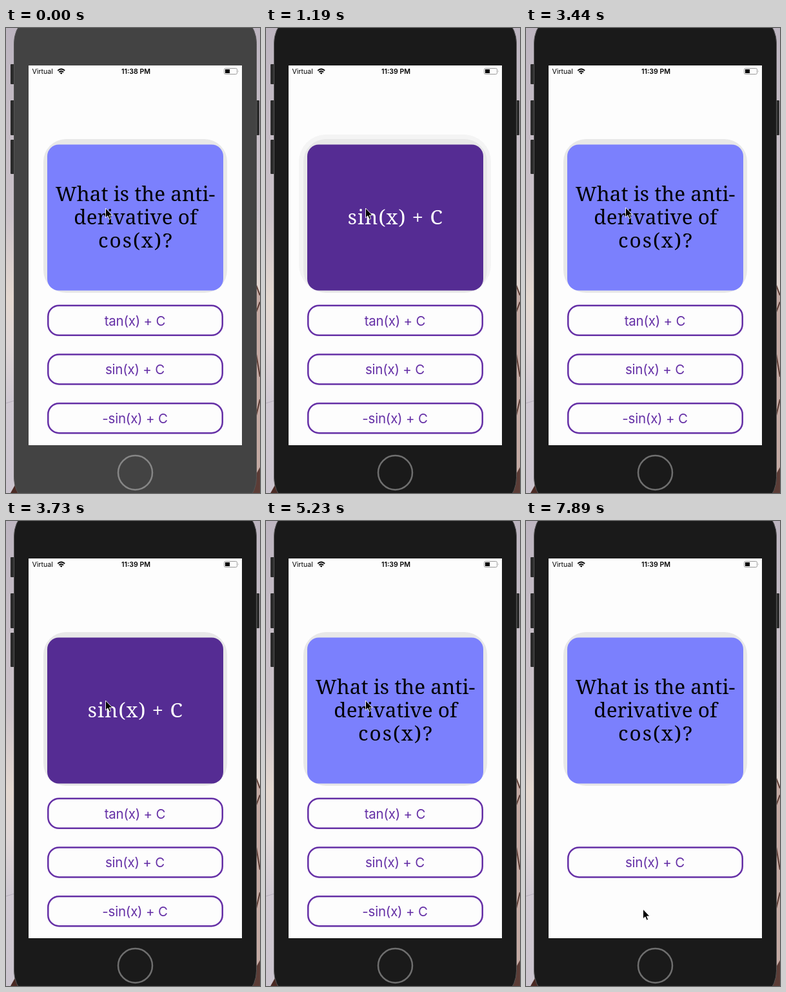
Animation of 394 by 720 pixels, one loop 8 s. Source, as an HTML page:

```html
<!DOCTYPE html>
<html lang="en">
<head>
<meta charset="utf-8">
<title>Flash card quiz</title>
<style>
  html, body { margin: 0; height: 100%; overflow: hidden; }
  svg { display: block; width: 394px; height: 720px; }
  text { text-anchor: middle; }
  .status { font: 10.6px Inter, sans-serif; }
  .card { font: 31.5px "Noto Serif", serif; }
  .choice text { font: 20.5px Inter, sans-serif; letter-spacing: -.2px; fill: #6530a6; }
  .choice rect { fill: none; stroke: #6530a6; stroke-width: 2.5; }
</style>
</head>
<body>
<svg viewBox="0 0 394 720">
  <defs>
    <linearGradient id="wall" x2="0" y2="1">
      <stop offset="0" stop-color="#bdb5c0"/>
      <stop offset=".4" stop-color="#cbc2c9"/>
      <stop offset=".58" stop-color="#e4d8d0"/>
      <stop offset=".68" stop-color="#dfd6d6"/>
      <stop offset=".8" stop-color="#d0c9d2"/>
      <stop offset="1" stop-color="#cbc4ce"/>
    </linearGradient>
  </defs>
  <rect width="394" height="720" fill="url(#wall)"/>
  <path d="M0 581L13 577" stroke="#b5adba"/>
  <path d="M7 720L16 704L32 720Z" fill="#4a2a24"/>
  <path d="M388 396L394 412V720H370L388 690Z" fill="#c4aaa3"/>
  <path d="M388 398L394 414M388 440L394 424M388 505L394 540M388 600L394 575"
        stroke="#5a3a32" stroke-width="2"/>
  <path d="M386 694L394 680V720H366Z" fill="#5b3c36"/>

  <g fill="#2b2b2b">
    <rect x="7" y="56" width="8" height="31" rx="1"/>
    <rect x="7" y="112" width="8" height="54" rx="1"/>
    <rect x="7" y="173" width="8" height="53" rx="1"/>
    <rect x="386" y="112" width="7" height="54" rx="1"/>
  </g>
  <rect id="body" x="12.5" y="-26.5" width="376" height="773" rx="50" stroke="#555"/>
  <circle id="home" cx="200.5" cy="688.5" r="26.5" fill="none" stroke-width="2.5"/>
  <rect x="35" y="58" width="331" height="588" fill="#fdfdfd"/>

  <g class="status">
    <text x="40.5" y="71" style="text-anchor:start">Virtual</text>
    <text id="clock" x="201.5" y="71" font-weight="600"></text>
  </g>
  <g fill="none" stroke="#000" stroke-width="1.9">
    <path d="M80.3 66Q85.7 60.8 91.1 66M82.3 68.4Q85.7 65.2 89.1 68.4"/>
    <path d="M83.7 69.6Q85.7 68 87.7 69.6L85.7 71.8Z" fill="#000" stroke="none"/>
  </g>
  <rect x="338.5" y="62.5" width="20" height="9" rx="2" fill="none" stroke="#999"/>
  <rect x="340" y="64" width="7" height="6" fill="#000"/>
  <path d="M360 65.5Q361.5 67 360 68.5Z" fill="#999"/>

  <rect id="glow" x="51" y="165" width="298" height="244" rx="42" fill="#f4f4f4"/>
  <rect x="58" y="172" width="285" height="238" rx="35" fill="#e8e8e8"/>
  <rect id="face" x="64" y="180.5" width="273" height="226" rx="18"/>
  <g id="question" class="card">
    <text x="200.5" y="268">What is the anti-</text>
    <text x="201" y="304">derivative of</text>
    <text x="201.5" y="340" letter-spacing="2">cos(x)?</text>
  </g>
  <text id="answer" class="card" x="200.8" y="304" letter-spacing="1" fill="#fff">sin(x) + C</text>

  <g id="choices"></g>
  <path id="cursor" d="M1.5 1V16L4.9 12.8L7.2 18.2L9.6 17.2L7.4 12H12Z" stroke="#fff" stroke-width=".9"/>
</svg>
<script>
const LOOP = 8000;
const $ = id => document.getElementById(id);
const show = (el, on) => el.style.display = on ? "" : "none";
const within = (t, a, b) => t >= a && t < b;

// label, moment pressed, moment removed
const choices = [
  ["tan(x) + C", 6560, 6710],
  ["sin(x) + C", LOOP, LOOP],
  ["-sin(x) + C", 7750, 7890]
];
// time, x, y: the pointer jumps from stop to stop
const stops = [
  [0, 153, 278], [3440, 153, 277], [5670, 153, 289], [5820, 170, 383],
  [5970, 179, 419], [6110, 180, 438], [6260, 180, 444.5], [7150, 181, 553.5],
  [7300, 181, 588.5], [7450, 181, 596.5], [7600, 180, 600]
];

$("choices").innerHTML = choices.map(([label], i) => `
  <g class="choice" transform="translate(0 ${i * 75.7})">
    <rect x="65.25" y="429.75" width="270.5" height="46" rx="17"/>
    <text x="200" y="460.8">${label}</text>
  </g>`).join("");

function draw(t) {
  const focused = t >= 1040;
  $("body").setAttribute("fill", focused ? "#1a1a1a" : "#434343");
  $("home").setAttribute("stroke", focused ? "#6f6f6f" : "#868686");
  $("clock").textContent = t < 600 ? "11:38 PM" : "11:39 PM";

  const flipped = within(t, 1190, 2240) || within(t, 3730, 5230);
  $("face").setAttribute("fill", flipped ? "#552c93" : "#7b80fd");
  show($("question"), !flipped);
  show($("answer"), flipped);
  show($("glow"), within(t, 1040, 3440));

  choices.forEach(([, press, gone], i) => {
    const el = $("choices").children[i];
    show(el, t < gone);
    el.querySelector("text").style.opacity = t < press ? 1 : 0.2;
  });

  const [, x, y] = stops.filter(s => s[0] <= t).pop();
  $("cursor").setAttribute("transform", `translate(${x} ${y})`);
}

const start = performance.now();
function tick() {
  draw((performance.now() - start) % LOOP);
  requestAnimationFrame(tick);
}
tick();
</script>
</body>
</html>
```
